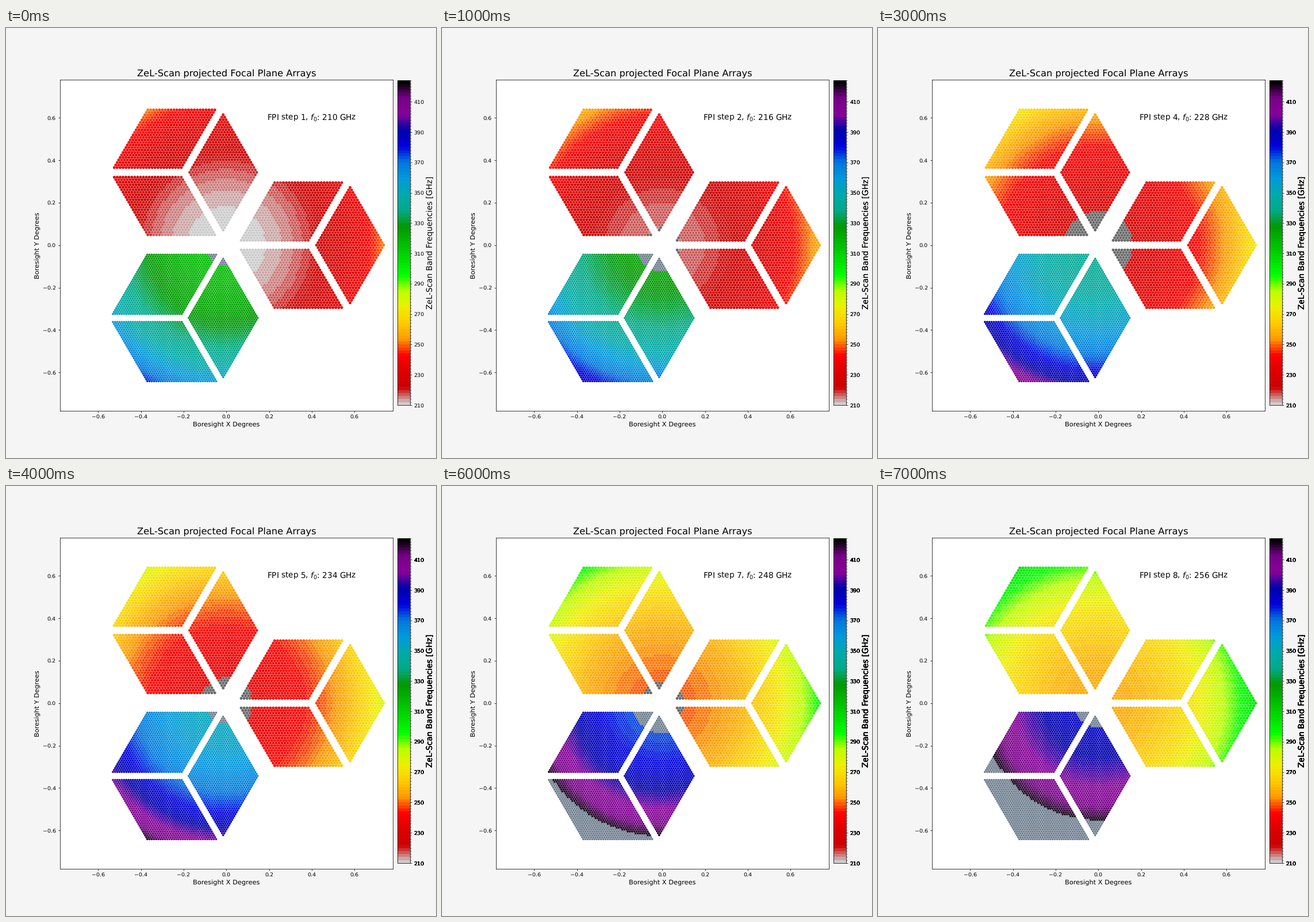
Animation of 748 by 748 pixels, one loop 8 s. Source, as a matplotlib script:

```python
import numpy as np
import matplotlib.pyplot as plt
from matplotlib.animation import FuncAnimation
from matplotlib.cm import ScalarMappable
from matplotlib.colors import Normalize, to_rgba

NAME = "ZeL-Scan"
STEPS = 8
F_MIN, F_MAX, F_CUT = 210, 424, 422      # GHz

# Radius of the blind spot around the boresight, per step
LOW_BLIND = [0, .085, .12, .16, .12, .085, .102, 0]
HIGH_BLIND = [.1, .125, .08, 0, .1, .125, .142, .115]

plt.rcParams.update({"font.family": "DejaVu Sans", "text.hinting": "none"})
cmap = plt.get_cmap("nipy_spectral_r", (F_MAX - F_MIN) // 2)
norm = Normalize(F_MIN, F_MAX)


def polar(r, degrees):
    a = np.radians(degrees)
    return r * np.array([np.cos(a), np.sin(a)])


def rhombus(center, edge, angle, count):
    """Lattice of count x count detectors, short diagonal along angle."""
    t = np.linspace(-.5, .5, count)
    u, v = (g.reshape(-1, 1) for g in np.meshgrid(t, t))
    return (center + u * polar(edge, angle + 60)
            + v * polar(edge, angle - 60))


def hexagon(direction, edge, count):
    center = polar(.396, direction)
    return np.vstack([rhombus(center + polar(.183, a), edge, a, count)
                      for a in (0, 120, 240)])


def base_frequency(step):
    """The mirror gap shrinks evenly, so 1/f is linear in the step."""
    return 1 / np.interp(step, [0, STEPS - 1], [1 / 210, 1 / 256])


low = np.vstack([hexagon(0, .3135, 24), hexagon(120, .3135, 24)])
high = hexagon(240, .322, 32)
dots = np.vstack([low, high])
radius = np.hypot(*dots.T)
is_high = np.arange(len(dots)) >= len(low)
order = np.where(is_high, 1.5, 1)
spread = 1 + .28 * radius**2 + .15 * radius**4


def dot_colors(step):
    f = base_frequency(step) * order * spread
    colors = cmap(norm(f))
    colors[~is_high & (radius < LOW_BLIND[step])] = to_rgba("dimgray")
    off = (radius < HIGH_BLIND[step]) | (f > F_CUT)
    colors[is_high & off] = to_rgba("slategray")
    return colors


fig, ax = plt.subplots(figsize=(11, 11), dpi=68, facecolor="whitesmoke")
ax.set(xlim=(-.78, .78), ylim=(-.78, .78))
ax.set_title(f"{NAME} projected Focal Plane Arrays", fontsize=17.28)
ax.set_xlabel("Boresight X Degrees", fontsize=12)
ax.set_ylabel("Boresight Y Degrees", fontsize=12)
scatter = ax.scatter(*dots.T, s=np.where(is_high, 16, 27), linewidths=0)
caption = ax.text(.4, .6, "", fontsize=14.4, ha="center", va="center")

cax = fig.add_axes([.91, .123, .03, .755])
bar = fig.colorbar(ScalarMappable(norm, cmap), cax=cax)
ticks = range(210, 411, 20)
bar.set_ticks(ticks, labels=[""] * len(ticks))
bar.set_ticks(np.arange(F_MIN, F_MAX + 1, 2), minor=True)


def bar_texts():
    """One layer of scale lettering; stacked layers look heavier."""
    layer = [cax.annotate(str(f), (1, f), xycoords=cax.get_yaxis_transform(),
                          xytext=(7, 0), textcoords="offset points",
                          fontsize=10, va="center_baseline",
                          annotation_clip=False)
             for f in ticks]
    layer.append(cax.annotate(f"{NAME} Band Frequencies [GHz]", (1, .5),
                              xycoords="axes fraction", xytext=(30, 0),
                              textcoords="offset points", fontsize=14.4,
                              rotation=90, rotation_mode="anchor",
                              ha="center", va="top"))
    return layer


layers = [bar_texts() for _ in range(STEPS)]


def update(step):
    scatter.set_facecolors(dot_colors(step))
    caption.set_text(f"FPI step {step + 1}, $f_0$: "
                     f"{base_frequency(step):.0f} GHz")
    for i, layer in enumerate(layers):
        for text in layer:
            text.set_visible(i <= step)
    return [scatter, caption]


anim = FuncAnimation(fig, update, frames=STEPS, interval=1000,
                     init_func=lambda: update(0), repeat=True, repeat_delay=0)
plt.show()
```
